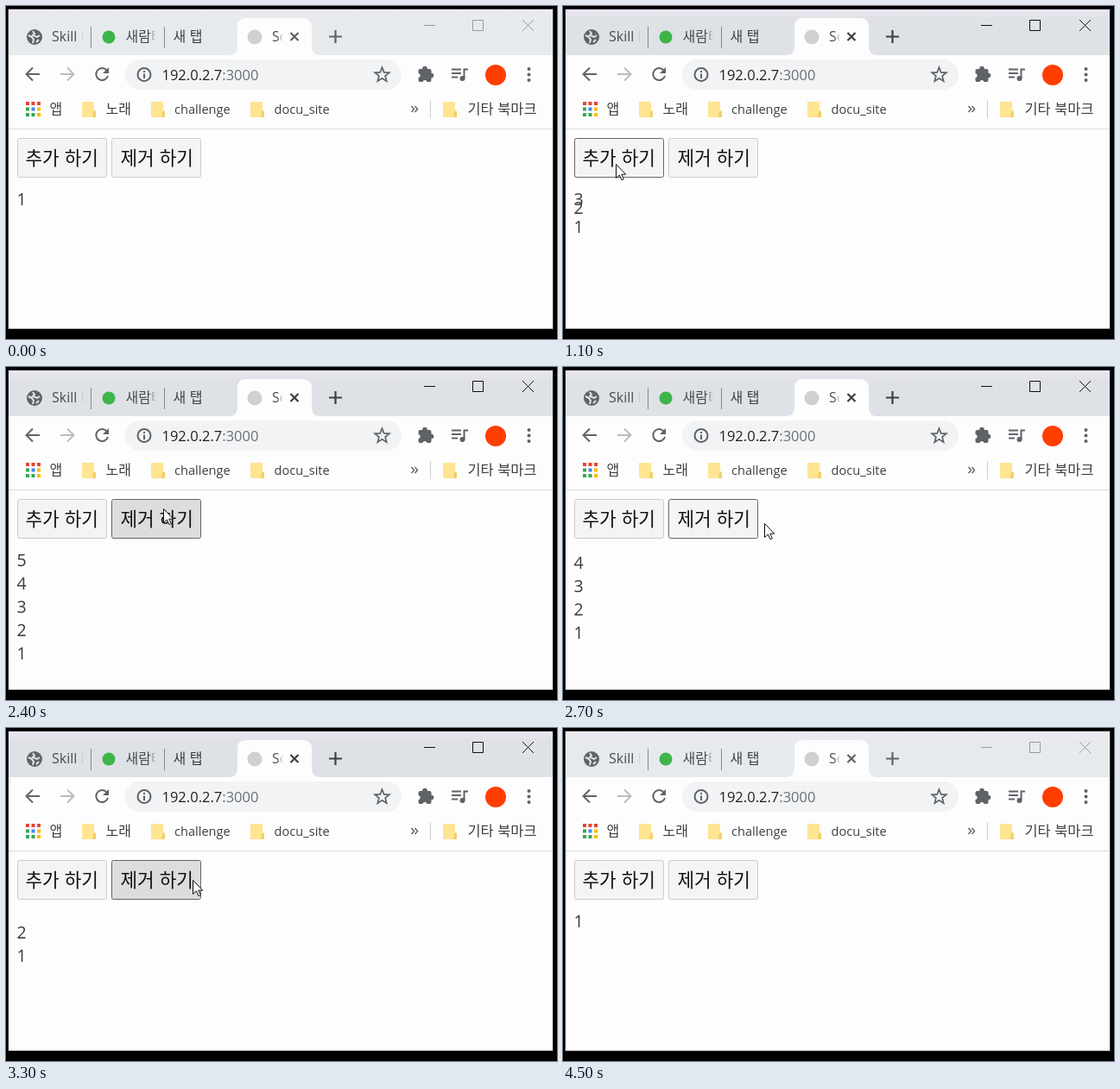
An HTML page for the animation above (4.6 s loop, 638 px wide and 386 px high).

```html
<!DOCTYPE html>
<html lang="ko">
<head>
<meta charset="utf-8">
<title>List animation</title>
<style>
  html, body { margin: 0; width: 100%; height: 100%; overflow: hidden; background: #000; }
  svg { display: block; }
  text { font: 16px "Noto Sans CJK KR", "Noto Sans CJK", sans-serif; fill: #3c4043; white-space: pre; }
  .latin { font-family: "Open Sans", "Noto Sans", sans-serif; }
  .bookmark { font-size: 14.6px; }
  .url { font-size: 16.5px; }
  .icon { fill: none; stroke: #5f6368; stroke-width: 2; }
  .solid { fill: #5f6368; }
  .button rect { fill: #f4f4f4; stroke: #ccc; }
  .button text { font-size: 21.3px; fill: #111; }
  .button.focus rect { stroke: #666; }
  .button.pressed rect { fill: #ddd; }
  #items text { font-size: 19.5px; fill: #3a3a3a; }
  #frame { fill: #fdfdfd; stroke: #3a3a3a; }
  #strip { fill: #e7eaed; }
  #controls { fill: none; stroke: #999; }
  #tabTools { fill: none; stroke: #5f6368; stroke-width: 2.2; }
  .active #frame { stroke: #10182c; }
  .active #strip { fill: #dee1e6; }
  .active #controls { stroke: #111; }
  .active #tabTools { stroke: #3c4043; }
</style>
</head>
<body>
<svg id="stage" width="638" height="386" viewBox="0 0 638 386">
  <defs>
    <linearGradient id="fade">
      <stop offset="0" stop-color="#484c50"/>
      <stop offset="1" stop-color="#484c50" stop-opacity="0"/>
    </linearGradient>
    <linearGradient id="fade1" href="#fade" gradientUnits="userSpaceOnUse" x1="80" x2="90"/>
    <linearGradient id="fade2" href="#fade" gradientUnits="userSpaceOnUse" x1="165" x2="174"/>
    <linearGradient id="fade3" href="#fade" gradientUnits="userSpaceOnUse" x1="314" x2="321"/>
    <linearGradient id="tint" x2="0" y2="1">
      <stop offset="0" stop-color="#f3e8f5" stop-opacity=".7"/>
      <stop offset="1" stop-color="#f3e8f5" stop-opacity="0"/>
    </linearGradient>
    <g id="folder">
      <path d="M0 0H14V9L16 11V18H0Z" fill="#ffe492"/>
      <path d="M13 11H16V18H12Z" fill="#f3cf69"/>
    </g>
  </defs>

  <rect id="frame" x="2.5" y="3.5" width="631" height="371"/>
  <rect id="strip" x="3" y="4" width="630" height="53"/>
  <rect x="3" y="4" width="630" height="12" fill="url(#tint)"/>

  <!-- Tabs -->
  <path d="M258 57Q268 57 268 47V24Q268 14 278 14H344Q354 14 354 24V47Q354 57 364 57Z" fill="#fdfdfd"/>
  <path d="M98.5 24V49M183.5 24V49" stroke="#85888d"/>
  <circle cx="33" cy="36" r="9" class="solid"/>
  <path d="M26 34L30 36 32 39 31 43M31 29L33 32 31 34 36 36 39 34M35 42L38 39" fill="none" stroke="#e3e6e9" stroke-width="2"/>
  <text class="latin" x="53" y="41" style="fill:url(#fade1)">Skill I</text>
  <circle cx="119" cy="36" r="7.5" fill="#3db54a"/>
  <text x="138.5" y="41" style="fill:url(#fade2)">새람터</text>
  <text x="193.5" y="41">새 탭</text>
  <circle cx="288" cy="36" r="8.5" fill="#d0d0d0"/>
  <text class="latin" x="308" y="41" style="fill:url(#fade3)">So</text>
  <path id="tabTools" d="M329.5 31L338.5 40M338.5 31L329.5 40M374 35.5H389M381.5 28V43"/>
  <path id="controls" d="M484 22.5H497M540.5 16.5H552.5V28.5H540.5ZM598 16L611 29M611 16L598 29"/>

  <!-- Toolbar -->
  <rect x="138" y="62" width="320" height="35" rx="17.5" fill="#f1f3f4"/>
  <path class="icon" d="M39 79H24M31 71.5L23.5 79 31 86.5"/>
  <path class="icon" d="M63 79H78M71 71.5L78.5 79 71 86.5" style="stroke:#babcbe"/>
  <path class="icon" d="M117 75A7 7 0 1 0 118 81"/>
  <path class="solid" d="M119 71V78H112Z"/>
  <circle class="icon" cx="160" cy="79.5" r="7.5"/>
  <path class="icon" d="M160 78.5V84M160 75V77"/>
  <text class="latin url" x="180.5" y="85.5" style="fill:#202124">192.0.2.7<tspan fill="#6b6f74">:3000</tspan></text>
  <path id="star" class="icon" style="stroke-width:1.7"/>
  <g class="solid">
    <rect x="477.5" y="73" width="15" height="15" rx="2"/>
    <circle cx="485" cy="72.5" r="2.8"/>
    <circle cx="492.5" cy="80.5" r="2.8"/>
    <circle cx="605.5" cy="73" r="2"/>
    <circle cx="605.5" cy="79.5" r="2"/>
    <circle cx="605.5" cy="86" r="2"/>
    <circle cx="528.5" cy="84" r="3"/>
  </g>
  <path d="M477 78A2.6 2.6 0 0 1 477 83.2ZM482.4 88.5A2.6 2.6 0 0 1 487.6 88.5Z" fill="#fdfdfd"/>
  <path class="icon" d="M516 73.5H527M516 78H527M516 82.5H523M530.5 84V73.5H535"/>
  <circle cx="567" cy="80" r="12" fill="#ff3e00"/>

  <!-- Bookmarks -->
  <g id="apps"></g>
  <text x="50.5" y="125">앱</text>
  <use href="#folder" x="88" y="111"/>
  <text x="115.5" y="125">노래</text>
  <use href="#folder" x="168" y="111"/>
  <text class="latin bookmark" x="195" y="125">challenge</text>
  <use href="#folder" x="283" y="111"/>
  <text class="latin bookmark" x="310.5" y="125">docu_site</text>
  <path class="icon" d="M469.5 116L472.5 119.5 469.5 123M473.5 116L476.5 119.5 473.5 123" style="stroke-width:1.4"/>
  <path d="M491.5 109V130" stroke="#ccc"/>
  <use href="#folder" x="506" y="111"/>
  <text x="534.5" y="125" style="font-size:16.4px">기타 북마크</text>
  <path d="M3 142.5H633" stroke="#dadce0"/>

  <!-- Page -->
  <g class="button" id="addButton">
    <rect x="13.5" y="153.5" width="103" height="45" rx="2"/>
    <text x="22.5" y="184">추가 하기</text>
  </g>
  <g class="button" id="removeButton">
    <rect x="122.5" y="153.5" width="103" height="45" rx="2"/>
    <text x="132.5" y="184">제거 하기</text>
  </g>
  <g id="items"></g>
  <path id="cursor" d="M-.5 .5V16.5L3.3 13 6 18.7 8.3 17.7 5.8 12.2H10.7Z" fill="#fff" stroke="#111"/>
</svg>
<script>
const LOOP = 4600, STEP = 100, ROW = 27, GLIDE = 500, HOLD = 165;
const ADD_CLICKS = [862, 1029, 1266, 1645];
const REMOVE_CLICKS = [2450, 2929, 3176, 3434];

// Pointer path: time, x, y
const POINTER = [
  [100, 178, 217], [300, 115, 299], [500, 74, 210], [600, 61, 189], [700, 62, 183],
  [1200, 62, 183], [1500, 90, 188], [1700, 113, 191], [1800, 127, 197], [1900, 150, 186],
  [2100, 221, 143], [2300, 183, 164], [2500, 183, 164], [2700, 234, 181], [2800, 217, 176],
  [3600, 217, 176], [3700, 226, 149], [3900, 620, 56], [4000, 640, 50]
];

const byId = id => document.getElementById(id);
const make = (parent, tag, attributes) => {
  const node = document.createElementNS("http://www.w3.org/2000/svg", tag);
  for (const name in attributes) node.setAttribute(name, attributes[name]);
  return parent.appendChild(node);
};

const RED = "#ea4335", GREEN = "#34a853", BLUE = "#4285f4", YELLOW = "#fbbc05";
[RED, RED, RED, GREEN, BLUE, YELLOW, GREEN, GREEN, YELLOW].forEach((fill, i) =>
  make(byId("apps"), "rect", { x: 23 + i % 3 * 6.5, y: 111 + Math.floor(i / 3) * 6.5, width: 4, height: 4, fill }));

const starPoints = Array.from({ length: 10 }, (_, i) => {
  const angle = (i / 5 - 0.5) * Math.PI, radius = i % 2 ? 3.8 : 8.8;
  return `${435.5 + radius * Math.cos(angle)} ${80 + radius * Math.sin(angle)}`;
});
byId("star").setAttribute("d", `M${starPoints.join("L")}Z`);

const labels = [1, 2, 3, 4, 5].map(number => {
  const node = make(byId("items"), "text", { x: 12.5, class: "latin" });
  node.textContent = number;
  return node;
});

// Rows glide to their new places with a cubic ease-out.
function offset({ from, to, start }, time) {
  const progress = Math.min(1, (time - start) / GLIDE);
  return to + (from - to) * (1 - progress) ** 3;
}

function rowsAt(time) {
  const rows = [{ number: 1, from: 0, to: 0, start: 0 }];
  for (const click of [...ADD_CLICKS, ...REMOVE_CLICKS]) {
    if (click > time) break;
    for (const row of rows) row.from = offset(row, click);
    if (ADD_CLICKS.includes(click)) rows.unshift({ number: rows.length + 1, from: 0 });
    else rows.shift();
    rows.forEach((row, i) => { row.to = i * ROW; row.start = click; });
  }
  return rows;
}

function pointerAt(time) {
  const next = POINTER.findIndex(point => point[0] > time);
  if (next < 1) return null;
  const [t0, x0, y0] = POINTER[next - 1], [t1, x1, y1] = POINTER[next];
  const k = (time - t0) / (t1 - t0);
  return [x0 + (x1 - x0) * k, y0 + (y1 - y0) * k].map(Math.round);
}

function drawButton(id, clicks, focused, time) {
  const { classList } = byId(id);
  classList.toggle("focus", focused);
  classList.toggle("pressed", clicks.some(click => time >= click - HOLD && time < click));
}

function draw(time) {
  const active = time >= 700 && time < 4500;
  const removing = time >= REMOVE_CLICKS[0] - HOLD;
  byId("stage").classList.toggle("active", active);
  drawButton("addButton", ADD_CLICKS, active && !removing, time);
  drawButton("removeButton", REMOVE_CLICKS, active && removing, time);

  const rows = rowsAt(time);
  labels.forEach((label, i) => {
    const row = rows.find(({ number }) => number === i + 1);
    label.style.display = row ? "" : "none";
    if (row) label.setAttribute("y", 231 + offset(row, time));
  });

  const pointer = pointerAt(time);
  byId("cursor").style.display = pointer ? "" : "none";
  if (pointer) byId("cursor").setAttribute("transform", `translate(${pointer})`);
}

function tick() {
  draw(Math.floor(performance.now() % LOOP / STEP) * STEP);
  requestAnimationFrame(tick);
}
tick();
</script>
</body>
</html>
```
